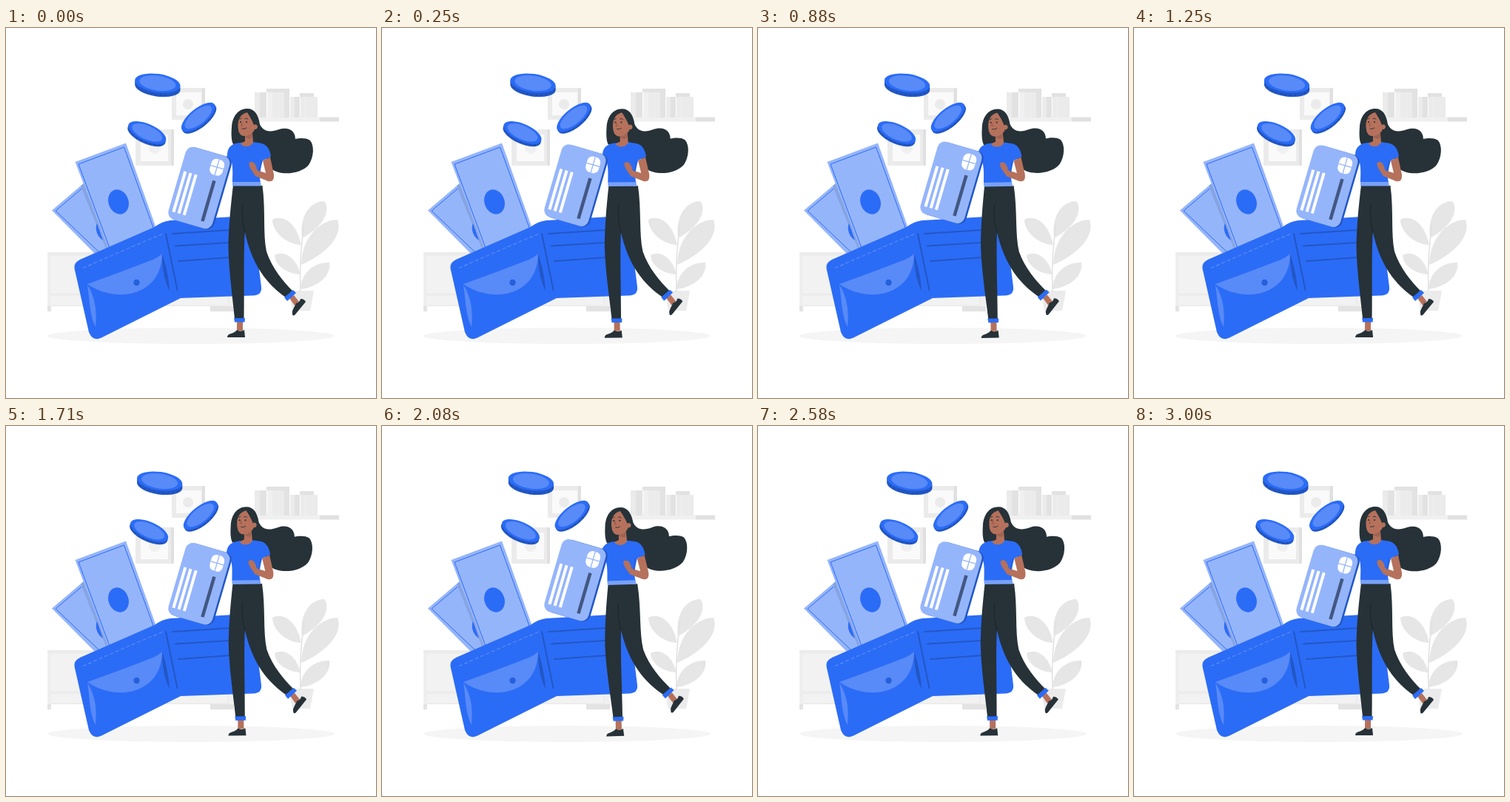
These frames come from a looping animation (500 px wide and 500 px high, 3.04 s). An HTML page:

```html
<!DOCTYPE html>
<html lang="en">
<head>
<meta charset="utf-8">
<title>Wallet</title>
<style>
html, body { margin: 0; width: 100%; height: 100%; overflow: hidden; background: #fff; }
svg { display: block; width: 100vw; height: 100vh; }
.blue { fill: #2b6cf6; }
.mid { fill: #588af8; }
.pale { fill: #95b5fb; }
.deep { fill: #2257c6; }
.dark { fill: #263238; }
.skin { fill: #b5715c; }
.line { fill: none; stroke: #2257c6; stroke-width: 2; stroke-linecap: round; }
.thin { fill: none; stroke: #2b6cf6; stroke-width: 1; }
</style>
</head>
<body>
<svg viewBox="0 0 500 500">
  <ellipse cx="250" cy="416" rx="194" ry="11" fill="#f5f5f5"/>

  <!-- cabinet -->
  <path d="M56 303H308V376H56Z" fill="#f0f0f0"/>
  <path d="M56 376H61V383H56ZM276 376H308V383H276Z" fill="#e3e3e3"/>
  <path d="M59 307H300V359H59ZM59 361H300V375H59Z" fill="#f2f2f2" stroke="#e8e8e8"/>
  <path d="M56 303H308V306H56Z" fill="#ebebeb"/>

  <!-- pictures -->
  <path d="M224 81H269V124H224Z" fill="#ebebeb"/>
  <path d="M265 81H269V124H265Z" fill="#e0e0e0"/>
  <path d="M230 87H264V118H230Z" fill="#fafafa"/>
  <circle cx="246" cy="103" r="7" fill="#ebebeb"/>
  <path d="M175 137H227V186H175Z" fill="#ebebeb"/>
  <path d="M223 137H227V186H223Z" fill="#e0e0e0"/>
  <path d="M182 144H219V180H182Z" fill="#fafafa"/>
  <circle cx="201" cy="162" r="8" fill="#f0f0f0"/>

  <!-- shelf -->
  <path d="M336 120.500H424V126.500H336Z" fill="#f0f0f0"/>
  <path d="M424 120.500H450V126.500H424Z" fill="#e0e0e0"/>
  <path d="M336 87H343V121H336ZM360 87H376V121H360ZM384 93H390V121H384ZM398 93H421V121H398Z" fill="#ebebeb"/>
  <path d="M343 87H352V121H343ZM352 82H383V87H352ZM376 87H383V121H376ZM390 93H397V121H390ZM397 88H416V93H397Z" fill="#e2e2e2"/>
  <path d="M353 87H360V121H353ZM368 87H369V121H368ZM404 93H405V121H404Z" fill="#f0f0f0"/>

  <!-- plant -->
  <g fill="#e6e6e6">
    <path d="M400 284C396 256 410 234 430 234C438 242 434 266 400 284Z"/>
    <path d="M399 293C380 293 360 276 360 259C374 252 392 262 399 293Z"/>
    <path d="M399 320C399 288 420 260 448 259C456 278 436 304 399 320Z"/>
    <path d="M398 333C380 332 364 322 363 307C376 300 392 310 398 333Z"/>
    <path d="M398 353C398 332 416 316 437 317C440 332 424 350 398 353Z"/>
    <path d="M382 355H416L411 382H387Z" fill="#ebebeb"/>
    <path d="M398 356Q396 310 403 264" fill="none" stroke="#e0e0e0" stroke-width="1.500"/>
  </g>

  <!-- banknotes -->
  <path class="pale" d="M62 246.500L106 209L160 290L123 308Z"/>
  <path class="thin" d="M126 303L67 247L106 214"/>
  <path d="M101 213.500L106 209L150 300L137 303Z" fill="#86a3e2"/>
  <path class="blue" d="M123 264C120 270 122 281 131 287Z"/>
  <path class="pale" d="M93.500 181L162 155.500L206 279L141 306Z"/>
  <path class="thin" d="M141 300L98 184L159.500 161L202 278"/>
  <ellipse class="blue" cx="152" cy="235" rx="13.500" ry="17" transform="rotate(-20 152 235)"/>

  <!-- wallet -->
  <path class="blue" d="M202 268Q212 261 222 260L325 254Q333 254 334 262L345 350Q346 361 334 361.500L236 365L216 330Z"/>
  <path class="line" d="M225 278L318 272M229 294.500L318 289M233 315L318 309"/>
  <path class="blue" d="M101 312.500L205 267Q215 264 219 276L236 365L129 418.500Q117 424 112 411L92.500 325Q91 317 101 312.500Z"/>
  <path class="line" d="M216 278L231.500 354"/>
  <path d="M104 324.500Q150 304 212 278" fill="none" stroke="#588af8" stroke-width="1.200" stroke-dasharray="5 3"/>
  <path class="mid" d="M110 346C134 363 170 366 192 348C205 338 211 322 211 305Q206 310 196 314Q152 331 110 346Z"/>
  <path class="mid" d="M110 347C121 364 123 384 121 404C113 390 113 366 110 347Z"/>
  <path class="deep" d="M211 305C211 324 214 342 221 355C220 337 216 320 211 305Z"/>
  <circle cx="176.500" cy="344" r="4.200" fill="#2560dc"/>

  <g id="coins"></g>

  <g id="woman">
    <path class="dark" d="M326 109C314 109 306 119 305 134C304 146 305 153 307 157L340 159C346 163 352 178 358 190C370 200 398 198 409 185C416 175 417 159 411 152C405 148 397 149 391 150C391 139 382 133 369 137C358 141 348 141 343 130C341 117 336 109 326 109Z"/>
    <!-- rear leg -->
    <path class="skin" d="M383 365L389 361L396 370L390 375Z"/>
    <path class="dark" d="M392 372Q397 371 398 366Q403 366 405 370L391 387Q388 390 387 387Q386 383 388 380Z"/>
    <path class="dark" d="M320 213H346.500C351 246 347 278 352 302C359 324 375 343 387 355L378 364C354 347 332 322 322 272Z"/>
    <path class="blue" d="M376 364L388 354L392 358L380 369Z"/>
    <!-- front leg -->
    <path class="skin" d="M312 396H320V409H312Z"/>
    <path class="dark" d="M312 408Q317 411 322 408L323 418H299Q299 414 304 413Q310 411 312 408Z"/>
    <path class="dark" d="M307 212H340C333 240 324 260 322.500 280C321 310 322 350 321.500 393H309C306 362 301 328 300.500 295C301 265 304 238 307 212Z"/>
    <path d="M320 238Q318 262 323 276" fill="none" stroke="#1b252a"/>
    <path class="blue" d="M308 392H323L322.500 397.500H309Z"/>
    <!-- neck and shirt -->
    <path class="blue" d="M316 155C306 156 300 160 299 170L298 178L305 182C307 190 306 200 306 209H344C342 200 344 190 347 179L358 174C357 165 353 158 346 156L334 154Z"/>
    <path d="M306 208H344L345 213.500H306Z" fill="#78a1fa"/>
    <path class="skin" d="M323 142H333L334 155Q331 160 325 160Q319 160 317 156L323 153Z"/>
    <!-- arm -->
    <path class="skin" d="M347 179L357 174.500L362 198Q363 209 354 207L337 200L331 191Q327 184 329 182Q331 180 335 182Q339 187 339 192L351 196Z"/>
    <path d="M345 179L342 194" fill="none" stroke="#2257c6" stroke-width=".8"/>
    <!-- face -->
    <path class="skin" d="M326 114C317 116 313.500 123 313.500 132C313.500 140 316 146 322 146C329 146 334 142 336 137Q340 137 340 133Q339 129 335 131C333 126 330 120 326 114Z"/>
    <path d="M323 146Q329 146 333 141L332 149Q326 151 323 146Z" fill="#9d6453"/>
    <g fill="none" stroke="#263238" stroke-width=".9" stroke-linecap="round">
      <path d="M315.500 123L318 122M323 122.500Q325 121 327 123"/>
      <path d="M319 128L317.800 131.500L320 132" stroke="#8e5140"/>
      <path d="M319 136Q322 137.500 325 135"/>
    </g>
    <circle class="dark" cx="317" cy="127" r="1.100"/>
    <circle class="dark" cx="325" cy="127" r="1.100"/>
    <circle cx="327" cy="133" r="2.300" fill="#c56f5b" opacity=".6"/>
  </g>

  <g id="card">
    <g transform="translate(260.900 216) rotate(16.300)">
      <rect class="deep" x="-28.500" y="-51" width="62" height="102" rx="10"/>
      <rect class="pale" x="-31" y="-51" width="62" height="102" rx="10"/>
      <rect x="6.500" y="-44.500" width="18" height="22" rx="7" fill="#fff"/>
      <path d="M6.500 -33.500H24.500M15.500 -44.500V-22.500" fill="none" stroke="#95b5fb" stroke-width="1.300"/>
      <path d="M-24 -16V41M-16.500 -16V41M-9 -16V41" stroke="#fff" stroke-width="4"/>
      <path d="M17 -15V42" stroke="#425782" stroke-width="4.500"/>
    </g>
  </g>
</svg>
<script>
const LOOP = 3040, LEAD = 40;
const SHAKE = [0, -1, 2, -4, 4, -4, 4, -4, 2, -1, 0];
const el = id => document.getElementById(id);
const place = (id, transform) => el(id).setAttribute('transform', transform);

function coin(x, y, rx, ry, turn, dx, dy) {
  const ring = (k, scale, attrs) =>
    `<ellipse rx="${rx * scale}" ry="${ry * scale}" ${attrs}
      transform="translate(${x + dx * k} ${y + dy * k}) rotate(${turn})"/>`;
  return ring(1, 1, 'class="deep"') + ring(.5, 1, 'class="deep"') +
    ring(.75, .93, 'fill="none" stroke="#1d4bab" stroke-width="2" stroke-dasharray="1.5 5"') +
    ring(0, 1, 'class="blue"') + ring(0, .8, 'class="mid"');
}
el('coins').innerHTML =
  coin(205, 74.5, 31, 12.5, 8, 0, 5.5) +
  coin(191, 141.3, 27.5, 11.5, 24, -1, 3.5) +
  coin(260, 120.5, 28, 11.5, -39, 1.5, 2.5);

// Triangle wave: 0 to 1 and back over 1500 ms
const swing = t => 1 - Math.abs(1 - 2 * ((t + 1500) % 1500) / 1500);

function shake(t) {
  const p = t % 3000 / 300, i = Math.floor(p);
  return SHAKE[i] + (SHAKE[i + 1] - SHAKE[i]) * (p - i);
}

const start = performance.now();
function draw() {
  const t = (performance.now() - start) % LOOP + LEAD;
  place('coins', `translate(${shake(t)} 0)`);
  place('card', `translate(0 ${.5 - 10 * swing(t)})`);
  place('woman', `rotate(${.32 - 2 * swing(t - 1420)} 357 263)`);
  requestAnimationFrame(draw);
}
draw();
</script>
</body>
</html>
```
